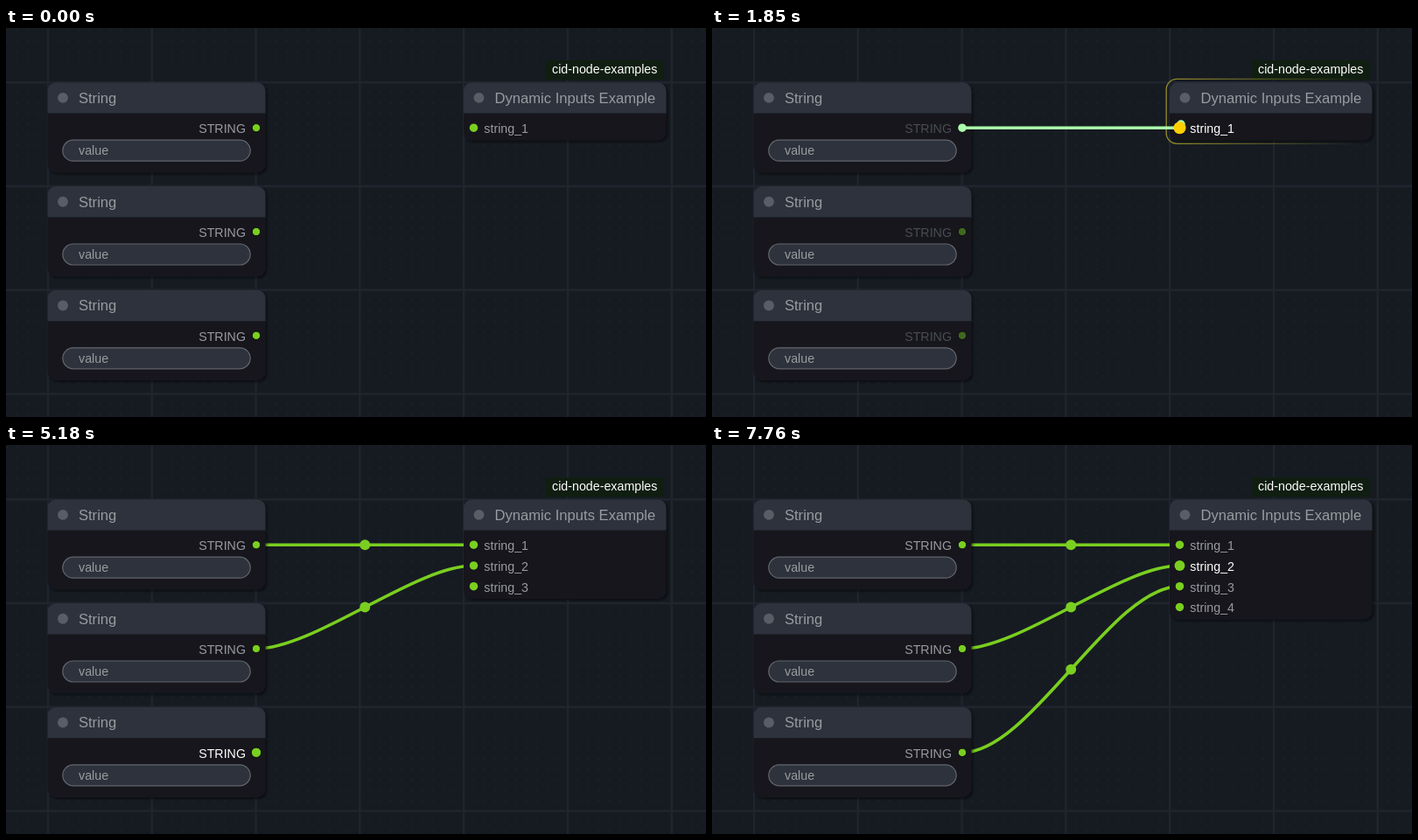
Animation of 800x445 px, one loop 8 s. Source, as an HTML page:

```html
<!DOCTYPE html>
<html lang="en">
<head>
<meta charset="utf-8">
<title>Dynamic inputs</title>
<style>
  html, body { margin: 0; width: 100%; height: 100%; overflow: hidden; background: #161b22; }
  svg { display: block; width: 800px; height: 445px; font-family: "Liberation Sans", Arial, sans-serif; }
</style>
</head>
<body>
<svg viewBox="0 0 800 445">
  <defs>
    <pattern id="dots" x="48" y="62.2" width="11.88" height="11.88" patternUnits="userSpaceOnUse">
      <rect x="-.7" y="-.7" width="1.4" height="1.4" fill="#20252c"/>
      <rect x="11.18" y="-.7" width="1.4" height="1.4" fill="#20252c"/>
      <rect x="-.7" y="11.18" width="1.4" height="1.4" fill="#20252c"/>
      <rect x="11.18" y="11.18" width="1.4" height="1.4" fill="#20252c"/>
    </pattern>
    <linearGradient id="glow" gradientUnits="userSpaceOnUse" x1="519" y1="0" x2="740" y2="0">
      <stop offset="0" stop-color="#b5a92c" stop-opacity=".8"/>
      <stop offset="1" stop-color="#b5a92c" stop-opacity="0"/>
    </linearGradient>
    <filter id="shadow" x="-10%" y="-10%" width="120%" height="125%">
      <feDropShadow dx="2" dy="2" stdDeviation="1.5" flood-color="#000" flood-opacity=".5"/>
    </filter>
  </defs>
  <rect width="800" height="445" fill="#161b22"/>
  <rect width="800" height="445" fill="url(#dots)"/>
  <g id="grid" stroke="#20252d" stroke-width="2.4"></g>
  <g id="scene"></g>
</svg>
<script>
const LOOP = 8000, UNIT = 1.188, TOP = 62.2, STEP = 118.8, SLOT = 23.76;
const GREEN = '#7acf20', PALE = '#aaffaa', DIM_GREEN = '#40681f';
const TEXT = '#999b9f', DIM_TEXT = '#494d51';
const OUT_X = 286, IN_X = 534.5, NODE_X = 523, NODE_W = 231.5;

const outY = i => 114.2 + STEP * i;
const inY = i => 114.2 + SLOT * i;

// One drag per output: mouse way points as [time, x, y], then the release.
const drags = [
  { path: [[850, OUT_X, outY(0)], [1270, 449, 124], [1640, 536, 110]], drop: 2000 },
  { path: [[3270, OUT_X, outY(1)], [3360, 382.5, 215.5], [3750, 536, 136]], drop: 4520 },
  { path: [[5500, OUT_X, outY(2)], [6030, 509, 189], [6180, 536, 160]], drop: 6820 }
];
// Slot highlights: [from, to, index]
const outHover = [[500, 850, 0], [2700, 3270, 1], [5150, 5500, 2]];
const inHover = [[2000, 2165, 0], [4520, 4745, 1], [6820, 7120, 2], [7400, 8000, 1]];

const circle = (x, y, r, fill, extra = '') =>
  `<circle cx="${x}" cy="${y}" r="${r}" fill="${fill}" ${extra}/>`;
const label = (x, y, text, fill, size = 12, extra = '') =>
  `<text x="${x}" y="${y}" font-size="${size * UNIT}" fill="${fill}" ${extra}>${text}</text>`;
const active = (list, t) => {
  const hit = list.find(([from, to]) => t >= from && t < to);
  return hit ? hit[2] : -1;
};

function wire(x1, y1, x2, y2, color, freeEnd) {
  const pull = Math.hypot(x2 - x1, y2 - y1) / 4;
  const endX = freeEnd ? x2 : x2 - pull;
  return `<path d="M${x1} ${y1}C${x1 + pull} ${y1} ${endX} ${y2} ${x2} ${y2}" fill="none" stroke="${color}" stroke-width="3.6"/>`;
}

function frame(x, y, w, h, title) {
  const r = 9.5, head = 35.4;
  return `<rect x="${x}" y="${y}" width="${w}" height="${h}" rx="${r}" fill="#14191d" filter="url(#shadow)"/>
    <path d="M${x} ${y + head}V${y + r}a${r} ${r} 0 0 1 ${r} ${-r}h${w - 2 * r}a${r} ${r} 0 0 1 ${r} ${r}V${y + head}z" fill="#2d323d"/>`
    + circle(x + 17.5, y + 17.7, 5.94, '#5a5d66') + label(x + 35.4, y + 23.6, title, TEXT, 14);
}

function stringNode(i, dimmed, hovered) {
  const y = TOP + STEP * i, on = hovered === i;
  return frame(47.5, y, 249, 103.3, 'String')
    + label(274, y + 57.9, 'STRING', on ? '#fff' : dimmed ? DIM_TEXT : TEXT, 12, 'text-anchor="end"')
    + circle(OUT_X, outY(i), on ? 5.7 : 4.7, dimmed ? DIM_GREEN : GREEN, 'stroke="#0b0f10"')
    + `<rect x="64.8" y="${y + 66}" width="214.4" height="24" rx="12" fill="#2d323c" stroke="#63666c" stroke-width="1.2"/>`
    + label(83, y + 83, 'value', TEXT);
}

function exampleNode(count, hovered, snapped) {
  const h = 66.3 + SLOT * (count - 1);
  let s = `<rect x="617" y="37" width="135" height="22.5" fill="#101e11"/>`
    + label(624, 52.2, 'cid-node-examples', '#fff')
    + frame(NODE_X, TOP, NODE_W, h, 'Dynamic Inputs Example');
  if (snapped >= 0)
    s += `<rect x="519.2" y="58.4" width="239" height="${h + 7.6}" rx="12" fill="none" stroke="url(#glow)" stroke-width="1.3"/>`;
  for (let i = 0; i < count; i++) {
    const on = i === hovered || i === snapped;
    s += circle(IN_X, inY(i), i === hovered ? 5.94 : 4.75, GREEN)
      + label(546.3, inY(i) + 5.9, 'string_' + (i + 1), on ? '#fff' : TEXT);
  }
  return s;
}

function mouseAt(path, t) {
  const [a, b, c] = path;
  const [from, to] = t < b[0] ? [a, b] : [b, c];
  let u = Math.min(1, (t - from[0]) / (to[0] - from[0]));
  if (to === c) u = 1 - (1 - u) ** 1.4;
  return [1, 2].map(k => from[k] + (to[k] - from[k]) * u);
}

function scene(t) {
  const linked = drags.filter(d => t >= d.drop).length;
  const current = drags.findIndex(d => t >= d.path[0][0] && t < d.drop);
  const dragging = current >= 0;
  const mouse = dragging && mouseAt(drags[current].path, t);
  const snapped = dragging && mouse[0] > 521 ? current : -1;
  let s = '';
  for (let i = 0; i < linked; i++)
    s += wire(OUT_X, outY(i), IN_X, inY(i), GREEN)
      + circle((OUT_X + IN_X) / 2, (outY(i) + inY(i)) / 2, 5.94, GREEN);
  for (let i = 0; i < 3; i++) s += stringNode(i, dragging, active(outHover, t));
  s += exampleNode(linked + 1, active(inHover, t), snapped);
  if (dragging) {
    const [x, y] = snapped >= 0 ? [IN_X, inY(snapped)] : mouse;
    s += wire(OUT_X, outY(current), x, y, PALE, snapped < 0)
      + circle(OUT_X, outY(current), 4.75, PALE) + circle(...mouse, 4.75, PALE);
    if (snapped >= 0) s += circle(x, y, 7, '#ffcf00');
  }
  return s;
}

let grid = '';
for (let i = 0; i < 7; i++) {
  const x = 48 + STEP * i, y = TOP + STEP * i;
  grid += `<path d="M${x} 0V445M0 ${y}H800"/>`;
}
document.getElementById('grid').innerHTML = grid;

const stage = document.getElementById('scene');
let last = '';
function draw() {
  const next = scene(performance.now() % LOOP);
  if (next !== last) stage.innerHTML = last = next;
  requestAnimationFrame(draw);
}
draw();
</script>
</body>
</html>
```
